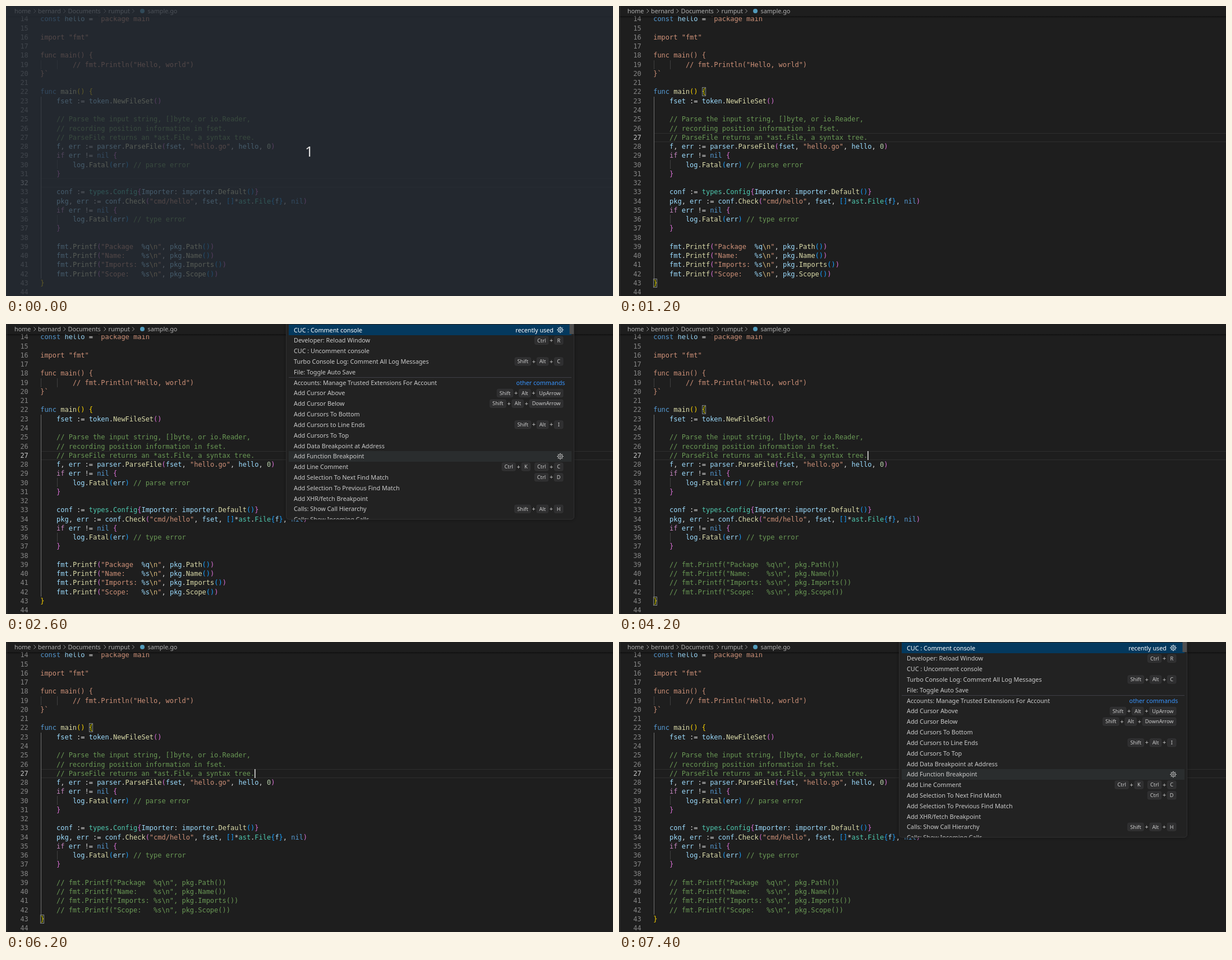
Recreate the animation shown at these times as an HTML page with a canvas. Size 1082x518 px, loop 8 s.

```html
<!DOCTYPE html>
<html lang="en">
<head>
<meta charset="utf-8">
<title>Commenting console lines</title>
<style>
html, body { margin: 0; width: 100%; height: 100%; overflow: hidden; background: #1e1e1e; }
canvas { display: block; }
</style>
</head>
<body>
<canvas id="stage" width="1082" height="518"></canvas>
<script>
const ctx = document.getElementById('stage').getContext('2d');
const W = 1082, H = 518, LOOP = 8000;
const MONO = '11.97px "DejaVu Sans Mono", monospace';
const UI = '10.8px "Noto Sans", sans-serif';
const KEY = '9.2px "Noto Sans", sans-serif';
const LEFT = 61.2, CHAR = 7.21, FIRST = 14, PITCH = 16.262;

const SOURCE = String.raw`const hello = ~package main

import "fmt"

func main() {
        // fmt.Println("Hello, world")
}~

func main() {
    fset := token.NewFileSet()

    // Parse the input string, []byte, or io.Reader,
    // recording position information in fset.
    // ParseFile returns an *ast.File, a syntax tree.
    f, err := parser.ParseFile(fset, "hello.go", hello, 0)
    if err != nil {
        log.Fatal(err) // parse error
    }

    conf := types.Config{Importer: importer.Default()}
    pkg, err := conf.Check("cmd/hello", fset, []*ast.File{f}, nil)
    if err != nil {
        log.Fatal(err) // type error
    }

    fmt.Printf("Package  %q\n", pkg.Path())
    fmt.Printf("Name:    %s\n", pkg.Name())
    fmt.Printf("Imports: %s\n", pkg.Imports())
    fmt.Printf("Scope:   %s\n", pkg.Scope())
}
`.replace(/~/g, '`');

const COLOR = {
  plain: '#d4d4d4', comment: '#6a9955', string: '#ce9178', name: '#9cdcfe', call: '#dcdcaa',
  type: '#4ec9b0', number: '#b5cea8', word: '#569cd6', flow: '#c586c0', escape: '#d7ba7d'
};
const BRACKETS = ['#ffd700', '#da70d6', '#179fff'];

function tokenColor(s, isCall) {
  if (s.startsWith('//')) return COLOR.comment;
  if (/^(func|const|nil)$/.test(s)) return COLOR.word;
  if (s === 'if') return COLOR.flow;
  if (/^\d/.test(s)) return COLOR.number;
  if (/^(types|Config|ast|File)$/.test(s)) return COLOR.type;
  if (isCall) return COLOR.call;
  return /^\w/.test(s) ? COLOR.name : COLOR.plain;
}

// Splits source into lines of [column, text, color].
function highlight(source) {
  let depth = 0, raw = false;
  const rule = /`|\/\/.*|"[^"]*"|[()[\]{}]|\w+|[^\w"()[\]{}\/`]+/g;
  return source.split('\n').map(line => {
    const out = [];
    for (const m of line.matchAll(rule)) {
      const s = m[0], at = m.index;
      if (s === '`') {
        raw = !raw;
        out.push([at, s, COLOR.string]);
      } else if (raw) {
        out.push([at, s, COLOR.string]);
      } else if (s[0] === '"') {
        for (const p of s.matchAll(/%\w|\\n|[^%\\]+/g)) {
          const c = p[0][0] === '%' ? COLOR.name : p[0][0] === '\\' ? COLOR.escape : COLOR.string;
          out.push([at + p.index, p[0], c]);
        }
      } else if (/^[([{]$/.test(s)) {
        out.push([at, s, BRACKETS[depth++ % 3]]);
      } else if (/^[)\]}]$/.test(s)) {
        out.push([at, s, BRACKETS[--depth % 3]]);
      } else {
        out.push([at, s, tokenColor(s, line[at + s.length] === '(')]);
      }
    }
    return out;
  });
}

const CODE = highlight(SOURCE);
const COMMENTED = highlight(SOURCE.replace(/^    fmt/gm, '    // fmt'));

const COMMANDS = [
  ['CUC : Comment console'],
  ['Developer: Reload Window', 'Ctrl+R'],
  ['CUC : Uncomment console'],
  ['Turbo Console Log: Comment All Log Messages', 'Shift+Alt+C'],
  ['File: Toggle Auto Save'],
  ['Accounts: Manage Trusted Extensions For Account'],
  ['Add Cursor Above', 'Shift+Alt+UpArrow'],
  ['Add Cursor Below', 'Shift+Alt+DownArrow'],
  ['Add Cursors To Bottom'],
  ['Add Cursors to Line Ends', 'Shift+Alt+I'],
  ['Add Cursors To Top'],
  ['Add Data Breakpoint at Address'],
  ['Add Function Breakpoint'],
  ['Add Line Comment', 'Ctrl+K Ctrl+C'],
  ['Add Selection To Next Find Match', 'Ctrl+D'],
  ['Add Selection To Previous Find Match'],
  ['Add XHR/fetch Breakpoint'],
  ['Calls: Show Call Hierarchy', 'Shift+Alt+H'],
  ['Calls: Show Incoming Calls']
];

const mid = n => 23.2 + (n - FIRST) * PITCH;

function rect(x, y, w, h, color) {
  ctx.fillStyle = color;
  ctx.fillRect(x, y, w, h);
}

function text(s, x, y, color, font, align = 'left') {
  ctx.font = font;
  ctx.textAlign = align;
  ctx.fillStyle = color;
  ctx.fillText(s, x, y);
}

function guide(x, from, to, color) {
  const top = Math.round(mid(from) - 8);
  rect(x, top, 1, Math.round(mid(to) + 8) - top, color);
}

function braceBox(column, line) {
  const x = Math.round(LEFT + column * CHAR), y = Math.round(mid(line) - 8);
  rect(x, y, 7, 16, 'rgba(0,100,0,.1)');
  ctx.strokeStyle = '#888';
  ctx.lineWidth = 1;
  ctx.strokeRect(x + .5, y + .5, 6, 15);
}

function drawCode(lines, active) {
  const y = Math.round(mid(active) - 8);
  rect(62, y, W - 62, 1, '#2e2e2e');
  rect(62, y + 15, W - 62, 1, '#2e2e2e');

  guide(62, 19, 19, '#404040');
  for (const n of [19, 30, 36]) guide(91, n, n, '#404040');
  guide(62, 23, 42, '#707070');

  lines.forEach((tokens, i) => {
    const n = FIRST + i, base = mid(n) + 4.2;
    text(n, 39.8, base, n === active ? '#c6c6c6' : '#858585', MONO, 'right');
    for (const [column, s, color] of tokens) text(s, LEFT + column * CHAR, base, color, MONO);
  });
}

function drawBreadcrumbs() {
  rect(0, 0, W, 18, '#1e1e1e');
  const shade = ctx.createLinearGradient(0, 18, 0, 22);
  shade.addColorStop(0, 'rgba(0,0,0,.45)');
  shade.addColorStop(1, 'rgba(0,0,0,0)');
  rect(0, 18, W, 4, shade);
  rect(1, 0, 1, H, '#333');

  const parts = [['home', 15], ['bernard', 57], ['Documents', 110.5], ['rumput', 182.5], ['sample.go', 252.5]];
  for (const [s, x] of parts) text(s, x, 13, '#b0b0b0', UI);

  ctx.strokeStyle = '#a0a0a0';
  ctx.lineWidth = 1;
  for (const x of [49.5, 102.5, 174.5, 225]) {
    ctx.beginPath();
    ctx.moveTo(x, 5.5);
    ctx.lineTo(x + 3.5, 9);
    ctx.lineTo(x, 12.5);
    ctx.stroke();
  }
  ctx.fillStyle = '#519aba';
  ctx.beginPath();
  ctx.arc(243, 9, 4, 0, 7);
  ctx.fill();
}

function gear(x, y, color) {
  ctx.strokeStyle = color;
  ctx.lineWidth = 1;
  ctx.beginPath();
  ctx.arc(x, y, 4, 0, 7);
  ctx.moveTo(x + 1.6, y);
  ctx.arc(x, y, 1.6, 0, 7);
  for (let i = 0; i < 8; i++) {
    const c = Math.cos(i * Math.PI / 4), s = Math.sin(i * Math.PI / 4);
    ctx.moveTo(x + c * 4, y + s * 4);
    ctx.lineTo(x + c * 5.8, y + s * 5.8);
  }
  ctx.stroke();
}

// Lays key caps out from the right edge.
function drawKeys(chords, y) {
  let right = 993;
  for (const chord of chords.split(' ').reverse()) {
    chord.split('+').reverse().forEach((key, i) => {
      if (i) {
        text('+', right - 5.3, y + 3.5, '#ccc', UI, 'center');
        right -= 10.7;
      }
      ctx.font = KEY;
      const w = Math.max(15.5, ctx.measureText(key).width + 9);
      ctx.beginPath();
      ctx.roundRect(right - w, y - 7.2, w, 14.2, 2.5);
      ctx.fillStyle = '#2f2f30';
      ctx.fill();
      ctx.strokeStyle = '#373738';
      ctx.lineWidth = .8;
      ctx.stroke();
      text(key, right - w / 2, y + 3.2, '#ccc', KEY, 'center');
      right -= w;
    });
    right -= 8;
  }
}

function drawPalette(age) {
  const x = 499, w = 514, bottom = 349.5;
  ctx.save();
  ctx.shadowColor = 'rgba(0,0,0,.4)';
  ctx.shadowBlur = 7;
  ctx.beginPath();
  ctx.roundRect(x, -10, w, bottom + 10, 5);
  ctx.fillStyle = '#222222';
  ctx.fill();
  ctx.restore();

  ctx.save();
  ctx.clip();
  rect(504, 1, 504, 19, '#04395e');
  rect(504, 227, 504, 19, '#2a2d2e');
  rect(504, 95, 504, 1, '#3f3f46');
  COMMANDS.forEach(([label, keys], i) => {
    const y = 10.6 + i * 18.81;
    text(label, 513, y + 4, i ? '#ccc' : '#fff', UI);
    if (keys) drawKeys(keys, y);
  });
  text('recently used', 976, 14.6, '#fff', UI, 'right');
  text('other commands', 996.5, 109, '#3794ff', UI, 'right');
  gear(988, 10.5, '#fff');
  gear(988, 236.5, '#ccc');
  ctx.globalAlpha = Math.min(1, (1 + Math.floor(age / 100)) / 3);
  rect(1004.5, 0, 8.5, 18, '#4f4f4f');
  ctx.restore();

  ctx.strokeStyle = '#303031';
  ctx.lineWidth = 1;
  ctx.beginPath();
  ctx.roundRect(x + .5, -10, w - 1, bottom + 9.5, 5);
  ctx.stroke();
}

function drawCountdown() {
  rect(0, 0, W, H, 'rgba(38,44,54,.73)');
  text('1', 540.5, 268.5, '#dcdcdc', '26px "Noto Sans", sans-serif', 'center');
}

function draw(t) {
  const opened = t >= 7200 ? 7200 : t >= 2400 && t < 4200 ? 2400 : 0;
  const clicked = t >= 700;

  rect(0, 0, W, H, '#1e1e1e');
  drawCode(t < 4200 ? CODE : COMMENTED, clicked ? 27 : 32);
  if (clicked && !opened) {
    braceBox(12, 22);
    braceBox(0, 43);
    const blink = Math.floor((t - (t < 2400 ? 700 : 4200)) / 500);
    if (blink % 2 === 0) rect(443, 227, 1.6, 16, '#d8d8d8');
  }
  drawBreadcrumbs();
  if (opened) drawPalette(t - opened);
  if (t < 100) drawCountdown();
}

function tick() {
  draw(performance.now() % LOOP);
  requestAnimationFrame(tick);
}
tick();
</script>
</body>
</html>
```
